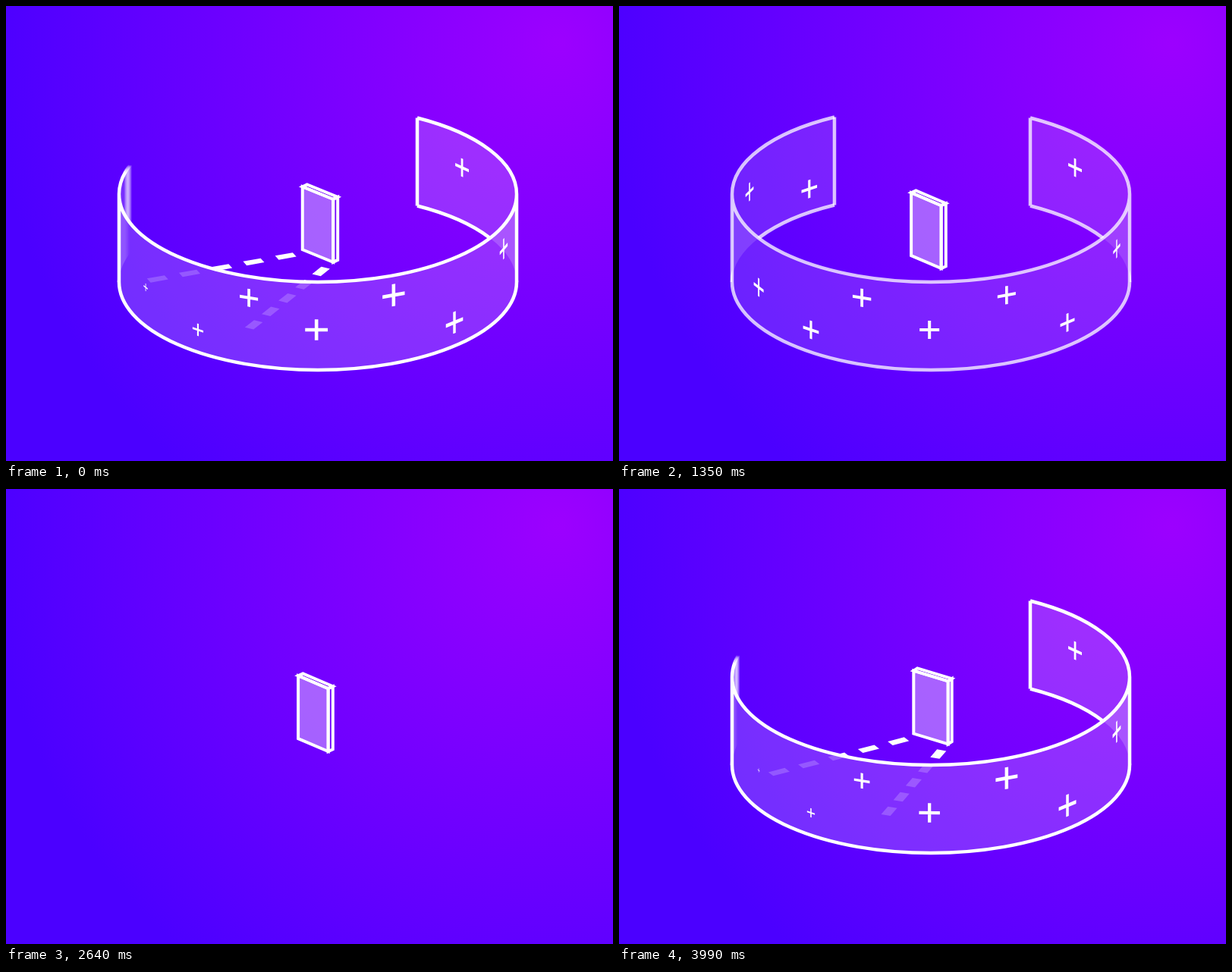
An HTML page with a canvas for the animation above (4020 ms loop, 800x600 px).

```html
<!DOCTYPE html>
<html lang="en">
<head>
<meta charset="utf-8">
<title>Panorama scan</title>
<style>
html, body { margin: 0; width: 100%; height: 100%; overflow: hidden; background: #4b00ff; }
canvas { display: block; }
</style>
</head>
<body>
<canvas id="stage" width="800" height="600"></canvas>
<script>
const ctx = document.getElementById('stage').getContext('2d');
const LOOP = 4020, STEP = 30;
const CX = 411, CY = 248, R = 262, TILT = 116 / 262, WALL = 116;
const FIRST = -60, LAST = 241;

// [angle on the ring, distance below the top rim, pop start]
const marks = [
  [-43.5, 45, 3100], [20.8, 31, 3635], [46.6, 85, 3695], [67.6, 26, 3750],
  [90.4, 63, 3810], [110.3, 28, 3858], [127.1, 86.5, 3918], [150, 65, 3960],
  [204.2, 44.5, 4060], [232.3, 85, 4350]
];

const rad = deg => deg * Math.PI / 180;
const ramp = (t, from, to) => Math.min(1, Math.max(0, (t - from) / (to - from)));
const swing = x => (1 - Math.cos(Math.PI * x)) / 2;
const edgeAt = t => FIRST + (LAST - FIRST) * Math.sin(ramp(t, 3049, 4520) * Math.PI / 2);
const white = a => `rgba(255,255,255,${a})`;

const sky = ctx.createRadialGradient(728, 48, 0, 728, 48, 750);
sky.addColorStop(0, '#9c00ff');
sky.addColorStop(1, '#4b00ff');

function rim(a, b, drop, move = true) {
  if (move) ctx.moveTo(CX + R * Math.cos(rad(a)), CY + drop + R * TILT * Math.sin(rad(a)));
  ctx.ellipse(CX, CY + drop, R, R * TILT, 0, rad(a), rad(b), b < a);
}

function band(a, b) {
  rim(a, b, 0);
  rim(b, a, WALL, false);
  ctx.closePath();
}

function post(a) {
  const x = CX + R * Math.cos(rad(a)), y = CY + R * TILT * Math.sin(rad(a));
  ctx.moveTo(x, y);
  ctx.lineTo(x, y + WALL);
}

function piece(a, b, alpha) {
  if (b <= a) return;
  ctx.beginPath();
  band(a, b);
  ctx.fillStyle = white(0.18 * alpha);
  ctx.fill();
}

function outline(a, b, alpha, posts = []) {
  if (b <= a) return;
  ctx.beginPath();
  rim(a, b, 0);
  rim(a, b, WALL);
  posts.forEach(post);
  ctx.strokeStyle = white(alpha);
  ctx.stroke();
}

// Clips to the inside or the outside of the near half of the wall.
function clipNear(edge, inside) {
  ctx.beginPath();
  if (!inside) ctx.rect(0, 0, 800, 600);
  if (edge > 0) band(0, Math.min(edge, 180));
  ctx.clip('evenodd');
}

function clipped(edge, inside, draw) {
  ctx.save();
  clipNear(edge, inside);
  draw();
  ctx.restore();
}

// The leading end is smeared over the angle it has just swept.
function wallHalf(from, to, edge, blur, alpha, paint) {
  const n = 8, solid = edge - blur;
  paint(from, Math.min(to, solid), alpha);
  for (let i = 0; i < n && blur > 0; i++) {
    const a = solid + blur * i / n, b = a + blur / n;
    paint(Math.max(from, a), Math.min(to, b), alpha * (1 - (i + 0.5) / n));
  }
}

function endPosts(edge, blur, alpha, near) {
  const n = blur > 0 ? 8 : 1;
  ctx.strokeStyle = white(alpha * (n > 1 ? Math.max(0.16, 1 - blur) : 1));
  for (let i = 1; i <= n; i++) {
    const a = edge - blur + blur * i / n;
    if ((a > 0 && a < 180) !== near) continue;
    ctx.beginPath();
    post(a);
    ctx.stroke();
  }
}

function farWall(edge, blur, alpha) {
  const ranges = [[FIRST, 0], [180, LAST]];
  for (const [a, b] of ranges) wallHalf(a, b, edge, blur, alpha, piece);
  clipped(edge, false, () => {
    for (const [a, b] of ranges) {
      wallHalf(a, b, edge, blur, alpha,
        (p, q, o) => outline(p, q, o, p === FIRST ? [FIRST] : []));
    }
    endPosts(edge, blur, alpha, false);
  });
}

function nearWall(edge, blur, alpha) {
  wallHalf(0, 180, edge, blur, alpha, piece);
  wallHalf(0, 180, edge, blur, alpha, (p, q, o) =>
    outline(p, q, o, [0, 180].filter(a => a === p || a === q)));
  endPosts(edge, blur, alpha, true);
}

function beams(view, length, alpha) {
  if (length <= 0) return;
  ctx.save();
  ctx.translate(CX, 332.5);
  ctx.scale(1, TILT);
  ctx.lineWidth = 13;
  ctx.strokeStyle = white(alpha);
  ctx.setLineDash([25, 20.5]);
  for (const side of [-1, 1]) {
    const x = -Math.sin(view) * 23.5 * side, y = Math.cos(view) * 23.5 * side;
    const dir = view + rad(6 + 19.5 * side), c = Math.cos(dir), s = Math.sin(dir);
    ctx.beginPath();
    ctx.moveTo(x + 14.5 * c, y + 14.5 * s);
    ctx.lineTo(x + (14.5 + length) * c, y + (14.5 + length) * s);
    ctx.stroke();
  }
  ctx.restore();
}

function phone(view, cy) {
  const c = Math.cos(view), s = Math.sin(view), H = 41.5;
  const quad = (corners, fill) => {
    ctx.beginPath();
    for (const [side, depth, h] of corners) {
      const w = side * 27.5, d = depth * 8.8;
      ctx.lineTo(CX - w * s - d * c, cy + (w * c - d * s) * TILT + h);
    }
    ctx.closePath();
    if (fill) {
      ctx.fillStyle = white(0.38);
      ctx.fill();
    }
    ctx.stroke();
  };
  const face = s > 0 ? 0 : 1, side = c > 0 ? 1 : -1;
  ctx.lineWidth = 4;
  ctx.strokeStyle = '#fff';
  quad([[-1, 0, -H], [1, 0, -H], [1, 1, -H], [-1, 1, -H]]);
  quad([[side, 0, -H], [side, 1, -H], [side, 1, H], [side, 0, H]]);
  quad([[-1, face, -H], [1, face, -H], [1, face, H], [-1, face, H]], true);
}

function pop(age) {
  if (age <= 0) return 0;
  if (age < 270) return 1.22 * Math.sin(age / 270 * Math.PI / 2);
  return 1 + 0.22 * (1 - swing(ramp(age, 270, 520)));
}

function plus([deg, drop, start], t, alpha) {
  const size = pop(t - start), c = Math.cos(rad(deg)), s = Math.sin(rad(deg));
  if (!size) return;
  ctx.save();
  ctx.transform(-s, TILT * c, 0, 1, CX + R * c, CY + R * TILT * s + drop);
  ctx.scale(size, size);
  ctx.fillStyle = white(alpha);
  ctx.beginPath();
  ctx.rect(-13, -2, 26, 4);
  ctx.rect(-2, -12, 4, 10);
  ctx.rect(-2, 2, 4, 10);
  ctx.fill();
  ctx.restore();
}

function draw(time) {
  const t = Math.floor((time % LOOP) / STEP) * STEP;
  const scan = t < 2500 ? t + LOOP : t;  // the scan runs across the loop point
  const view = rad(-46 + 360 * swing(ramp(scan, 3000, 5050)));
  const cy = 288 + 19 * swing(2 * ramp(t, 995, 2995));
  const edge = edgeAt(scan), blur = edge - edgeAt(scan - 26);
  const wallAlpha = ramp(scan, 3045, 3100) * (1 - ramp(scan, 5185, 5920));
  const markAlpha = 1 - ramp(scan, 5360, 6030);
  const beam = 207 * ramp(scan, 3050, 3450) * (1 - ramp(scan, 4400, 4950));

  ctx.fillStyle = sky;
  ctx.fillRect(0, 0, 800, 600);
  ctx.lineWidth = 4.5;
  if (wallAlpha > 0) farWall(edge, blur, wallAlpha);
  clipped(edge, false, () => beams(view, beam, 1));
  if (wallAlpha > 0) nearWall(edge, blur, wallAlpha);
  clipped(edge, true, () => beams(view, beam, 0.2));
  phone(view, cy);
  if (markAlpha > 0) marks.forEach(m => plus(m, scan, markAlpha));
}

function loop(now) {
  draw(now);
  requestAnimationFrame(loop);
}
draw(0);
requestAnimationFrame(loop);
</script>
</body>
</html>
```
